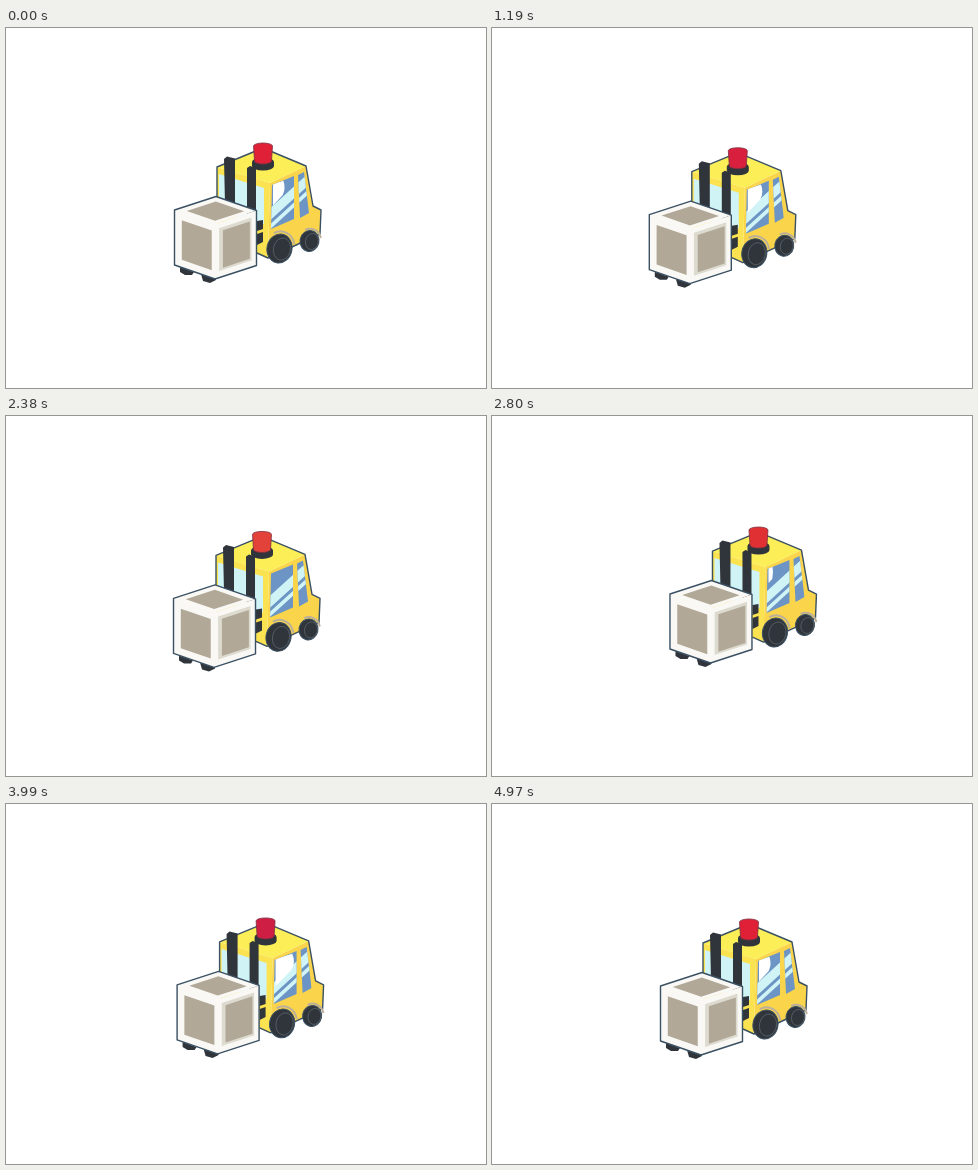
An HTML page that plays this animation: 480 px wide and 360 px high, repeating every 5040 ms.

```html
<!DOCTYPE html>
<html lang="en">
<head>
<meta charset="utf-8">
<title>Forklift</title>
<style>
  html, body { margin: 0; width: 100%; height: 100%; overflow: hidden; background: #fff; }
  svg { display: block; width: 480px; height: 360px; }
  .line { fill: none; stroke: #3a5063; stroke-width: 1.4; stroke-linejoin: round; }
  .dark { fill: #30353b; }
  .tyre { fill: #30353b; stroke: #3a5063; }
  .rim { fill: none; stroke: #555d64; stroke-width: .9; }
  .fender { fill: none; stroke: #bcb09a; stroke-width: 2; }
  .roof { fill: #fbee56; }
  .front { fill: #fbe250; }
  .side { fill: #fad54b; }
  .glass { fill: #d0f3f6; }
  .blue { fill: #6c95c6; }
  .wood { fill: #b1a898; }
  .bevel { fill: #dddbcf; }
  .white { fill: #f9f8f4; }
</style>
</head>
<body>
<svg viewBox="0 0 480 360">
  <defs>
    <clipPath id="panes">
      <path d="M266 157 288 148V191L265 201ZM292 147 298 144 303 185 294 190Z"/>
    </clipPath>
  </defs>
  <g id="truck">
    <path class="side" d="M264 155 300 138 307 178 315 182 314 206 262 230Z"/>
    <path class="front" d="M211 139 264 155 262 230 211 210Z"/>
    <path class="roof" d="M211 139 257 120 300 138 264 155Z"/>
    <path class="glass" d="M213 146 258 160V196L213 184Z"/>
    <g clip-path="url(#panes)">
      <path class="blue" d="M260 140H306V205H260Z"/>
      <path id="stripes" class="glass"/>
      <path id="glare" fill="#fff"/>
    </g>
    <path class="line" d="M211 172V139L257 120 300 138 307 178 315 182 314 206 262 230 251 225"/>
    <g id="wheels"></g>

    <path class="dark" d="M246 134V138A11 4.500 0 0 0 268 138V134A11 4.500 0 0 0 246 134Z"/>
    <path id="lamp" stroke="#7d3040" stroke-width=".8" d="M247.500 118A9.500 3 0 0 1 266.500 118L265.500 133A8.500 3 0 0 1 248.500 133Z"/>

    <g class="dark">
      <path d="M218 131 221 128.500 229 130.500V176H219ZM241 140 244 138 250 140V190H241Z"/>
      <path d="M251 193 257 192V201L251 203ZM251 206 257 204V214L251 217Z"/>
      <path d="M174 239 188 244 186 247 179 247 174 244ZM195 246 210 250V252L204 255 197 253Z"/>
    </g>
    <g id="crate"></g>
  </g>
</svg>
<script>
const LOOP = 5040, STEP = 70;
const $ = id => document.getElementById(id);

// Crate: three edges leave the near top corner.
const near = [209, 196], left = [-40.5, -14], right = [41.5, -13.5], down = [0, 55];

// Part of the face spanned by u and v, from (u0, v0) to (u1, v1).
function patch(name, u, v, u0 = 0, v0 = 0, u1 = 1, v1 = 1) {
  const at = (a, b) => near.map((n, i) => n + u[i] * a + v[i] * b);
  const corners = [at(u0, v0), at(u1, v0), at(u1, v1), at(u0, v1)];
  return `<path class="${name}" d="M${corners.join(' ')}Z"/>`;
}

const faces = [[left, right], [left, down], [right, down]];
$('crate').innerHTML =
  faces.map(([u, v]) => patch('white', u, v)).join('') +
  patch('bevel', right, down, .1, .1, .88, .88) +
  patch('wood', left, right, .12, .12, .82, .82) +
  patch('wood', left, down, .08, .14, .82, .86) +
  patch('wood', right, down, .19, .16, .84, .84) +
  `<path class="line" d="M168.500 182 210 168.500 250.500 182.500V237.500L209 251 168.500 237Z"/>`;

function wheel(x, y, rx, ry) {
  return `<g transform="translate(${x} ${y}) rotate(12)">
    <ellipse class="tyre" rx="${rx}" ry="${ry}"/>
    <ellipse class="rim" cx="2.5" rx="${rx * .68}" ry="${ry * .77}"/>
    <path class="fender" d="M${-rx * .7} ${-ry * .95}A${rx + 2} ${ry + 2} 0 0 1 ${rx + 1} ${-ry * .5}"/>
  </g>`;
}
$('wheels').innerHTML = wheel(303.5, 213, 9.5, 10.5) + wheel(273.5, 220.5, 12.5, 14.5);

const stripe = (y, h) => `M260 ${y}l46 -42v${h}l-46 42Z`;
$('stripes').setAttribute('d', stripe(184, 12) + stripe(200, 5));

// Eased progress between two times.
function ease(t, start, end) {
  const p = Math.min(1, Math.max(0, (t - start) / (end - start)));
  return (1 - Math.cos(Math.PI * p)) / 2;
}

// Back up, drive forward, return to the middle.
const shift = t =>
  -12 * ease(t, 140, 1400) + 24 * ease(t, 1750, 3080) - 12 * ease(t, 3360, 4270);

function draw(now) {
  const t = Math.floor(now % LOOP / STEP) * STEP;
  const x = shift(t), speed = shift(t + STEP / 2) - shift(t - STEP / 2);
  $('truck').setAttribute('transform', `translate(${x} ${-0.42 * x})`);

  // Lamp tint and window glare follow the speed.
  $('lamp').setAttribute('fill', `hsl(${353 + 5 * speed} 75% ${50 + 3 * speed}%)`);
  const w = Math.max(0, 13 - 6.5 * speed);
  $('glare').setAttribute('d',
    `M267 156l${w * .8} ${-w * .25}Q${267 + w} 160 ${267 + w * .75} 167L267 ${167 + w * .8}Z`);
  $('glare').setAttribute('opacity', Math.min(1, w / 3));
}

const begin = performance.now();
function tick() {
  draw(performance.now() - begin);
  requestAnimationFrame(tick);
}
tick();
</script>
</body>
</html>
```
